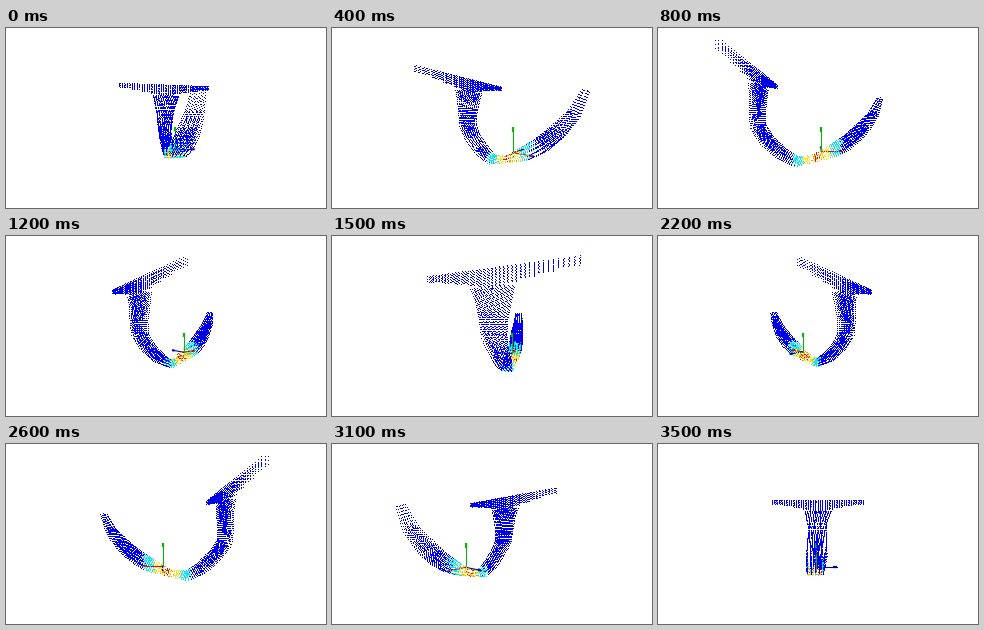
A matplotlib script that plays this animation: 320 by 180 pixels, repeating every 3600 ms.

```python
import numpy as np
import matplotlib.pyplot as plt
from matplotlib.animation import FuncAnimation

W, H, DPI = 320, 180, 100
FRAMES, STEP = 36, 100
FOCAL = H / 2 / np.tan(np.radians(30))
ORIGIN = np.array([6, -31, -2])
AXIS = 20
BLUE, CYAN, YELLOW, ORANGE, RED = "#0000e6", "#00e5ff", "#ffe000", "#ff9a00", "#e01000"

# depth, height, left edge, right edge, thickness along the curved strip
SPINE = np.array([
    (-54, 30, -17, 17, 6), (-54, 20, -15, 13, 6), (-55, 5, -12, 9, 7),
    (-54, -8, -11, 7, 8), (-46, -20, -10, 4, 9), (-32, -33, -9, 3, 9),
    (-18, -41, -8, 1, 7), (-6, -39, -8, 2, 5), (8, -35, -9, 4, 6),
    (22, -28, -9, 4, 11), (33, -21, -9, 5, 11), (44, -11, -8, 6, 10),
    (56, 3, -6, 5, 7), (63, 19, -4, 4, 3)], float)

rng = np.random.default_rng(4)


def strip():
    arc = np.r_[0, np.cumsum(np.hypot(*np.diff(SPINE[:, :2], axis=0).T))]
    s = np.arange(0, arc[-1], 1.9)
    p, y, qa, qb, thick = (np.interp(s, arc, c) for c in SPINE.T)
    dp, dy = np.gradient(p), np.gradient(y)
    norm = np.hypot(dp, dy)
    pts = []
    for i in range(len(s)):
        cols = np.linspace(qa[i], qb[i], max(3, int(round((qb[i] - qa[i]) / 3.1)) + 1))
        layers = np.linspace(-.5, .5, max(2, int(round(thick[i] / 2.6)) + 1)) * thick[i]
        for q in cols:
            for t in layers:
                pts.append((p[i] - dy[i] / norm[i] * t, y[i] + dp[i] / norm[i] * t, q))
    pts = np.array(pts)
    sparse = np.abs(pts[:, 0] - 2) < 13
    return pts[~sparse | (rng.random(len(pts)) < .55)]


def crossbar():
    pts = []
    for q in np.arange(-61, 61.1, 3.2):
        low = 39 - 10 * max(0, 1 - abs(q) / 52) ** 1.3
        for y in np.arange(45, low, -2.2):
            pts += [(p, y, q) for p in (-56.5, -54.5, -52.5)]
    return np.array(pts)


def heat(pts):
    d = np.abs(pts[:, 0] - 2) + rng.normal(0, 1.3, len(pts))
    d[pts[:, 1] > -14] = 99
    return np.select([d < 2.2, d < 4.5, d < 13, d < 23], [RED, ORANGE, YELLOW, CYAN], BLUE)


cloud = np.vstack([crossbar(), strip()])
colors = heat(cloud)


def turn(pts, a):
    p, y, q = np.asarray(pts, float).T
    return np.stack([q * np.cos(a) + p * np.sin(a), y, p * np.cos(a) - q * np.sin(a)], 1)


def camera(a):
    """Fit the view to the bounding box of the turned cloud."""
    box = turn(cloud, a)
    lo, hi = box.min(0), box.max(0)
    mid = (lo + hi) / 2
    dist = .7 * (hi - lo).max() * np.sqrt(3) * 1.015

    def project(pts):
        v = turn(pts, a) - mid
        depth = dist - v[:, 2]
        return W / 2 + FOCAL * v[:, 0] / depth, H / 2 - FOCAL * v[:, 1] / depth, depth
    return project


fig = plt.figure(figsize=(W / DPI, H / DPI), dpi=DPI, facecolor="white")
ax = fig.add_axes([0, 0, 1, 1])
ax.set(xlim=(0, W), ylim=(H, 0))
ax.axis("off")

PX = 72 / DPI
dots = [ax.scatter([], [], s=PX ** 2, marker="s", linewidths=0, antialiased=False, zorder=z)
        for z in (1, 3)]
arms = []
for vec, color in (((1, 0, 0), "#d01010"), ((0, 0, 1), "#0000a0"), ((0, 1, 0), "#10b010")):
    shaft, = ax.plot([], [], color=color, lw=1.1 * PX, zorder=2)
    head, = ax.plot([], [], color=color, lw=2.2 * PX, zorder=2, solid_capstyle="butt")
    arms.append((np.array(vec), shaft, head))


def draw(k):
    project = camera(np.radians(10 * (k + 1)))
    x, y, depth = project(cloud)
    split = project([ORIGIN])[2][0]
    order = np.argsort(-depth)
    for dot, keep in zip(dots, (depth >= split, depth < split)):
        idx = order[keep[order]]
        dot.set_offsets(np.floor(np.stack([x[idx], y[idx]], 1)) + .5)
        dot.set_facecolors(list(colors[idx]))
    for vec, shaft, head in arms:
        length = AXIS + 3 * vec[1]
        ends = [ORIGIN + vec * length * f for f in (0, .8, 1)]
        u, v, _ = project(ends)
        shaft.set_data(u, v)
        head.set_data(u[1:], v[1:])
    return dots


anim = FuncAnimation(fig, draw, frames=FRAMES, interval=STEP, repeat=True, repeat_delay=0)
plt.show()
```
